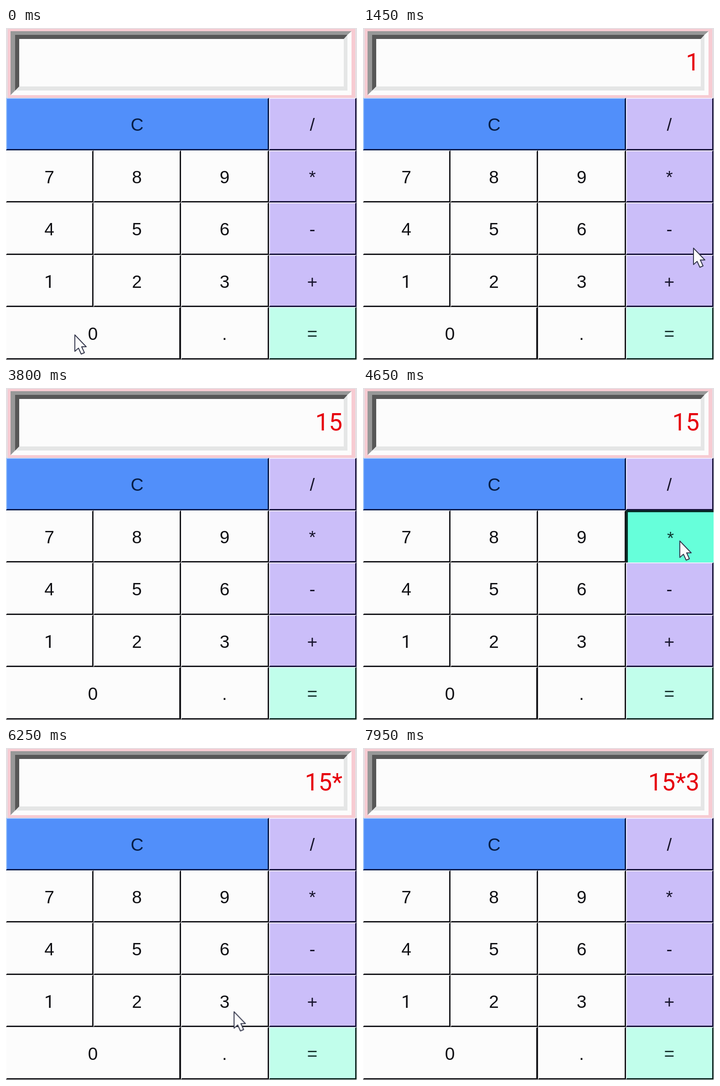
An HTML page for the animation above (8 s loop, 770 by 727 pixels).

```html
<!DOCTYPE html>
<html lang="en">
<head>
<meta charset="utf-8">
<title>Calculator</title>
<style>
  html, body { margin: 0; width: 100%; height: 100%; overflow: hidden; background: #fcfcfc; }
  #stage {
    position: relative; width: 770px; height: 727px; overflow: hidden;
    font-family: "Liberation Sans", Arial, sans-serif;
  }
  #stage div { position: absolute; box-sizing: border-box; }

  .panel {
    left: 0; top: 0; width: 770px; height: 153px; background: #f7cbd2;
    border: solid #e5dfe3; border-width: 2px 4px 0 4px;
  }
  .bevel {
    left: 10px; top: 7px; width: 748px; height: 140px; border: solid;
    border-width: 8px 9px 10px 10px; border-color: #989898 #fcfcfc #fcfcfc #989898;
  }
  .screen {
    left: 20px; top: 15px; width: 729px; height: 122px; background: #fcfcfc; border: solid;
    border-width: 9px 8px 9px 9px; border-color: #575757 #e5e6e6 #e5e6e6 #575757;
  }
  .screen::after {
    content: ""; position: absolute; right: 3px; top: 21px;
    font: 53px/60px Roboto, sans-serif; color: #e6000c;
    animation: typing 8s step-end infinite;
  }
  @keyframes typing {
    0% { content: ""; }
    11.25% { content: "1"; }
    38.75% { content: "15"; }
    58.75% { content: "15*"; }
    88.75%, 100% { content: "15*3"; }
  }

  .key {
    --face: #fcfcfc; --ink: #101014; --light: #fdfdfd; --dark: #17171b;
    background: var(--face); color: var(--ink);
    border: solid; border-width: 2px 3px 3px 2px;
    border-color: var(--light) var(--dark) var(--dark) var(--light);
    padding-right: 1px; text-align: center; font-size: 39px; line-height: 114px;
  }
  .op { --face: #cbbef9; --ink: #17142c; --light: #f1ecff; --dark: #17123a; }
  .clear { --face: #518ffa; --ink: #071c44; --light: #a9cdfa; --dark: #071a4a; }
  .equals { --face: #c1feeb; --ink: #14302a; --light: #e4fff7; --dark: #0d2620; }
  .zero { border-right-width: 4px; }
  .one { font-family: Roboto, sans-serif; }

  .typed { animation: press 8s step-end infinite; }
  @keyframes press {
    0% {
      background: #66ffda; color: #0c3a30; border-width: 4px 0 0 4px;
      border-color: #062e26 #66ffda #66ffda #062e26;
    }
    3.75%, 100% {
      background: var(--face); color: var(--ink); border-width: 2px 3px 3px 2px;
      border-color: var(--light) var(--dark) var(--dark) var(--light);
    }
  }

  #pointer {
    position: absolute; left: 0; top: 0; overflow: visible;
    animation: wander 8s ease-in-out infinite;
  }
  /* Visits each pressed key, then moves aside. */
  @keyframes wander {
    0% { transform: translate(151px, 672px); }
    7.5%, 11.25% { transform: translate(115px, 565px); }
    18.125%, 20% { transform: translate(725px, 482px); }
    30% { transform: translate(392px, 535px); }
    35%, 38.75% { transform: translate(305px, 450px); }
    46%, 49% { transform: translate(790px, 470px); }
    55%, 58.75% { transform: translate(695px, 335px); }
    67%, 70% { transform: translate(504px, 677px); }
    80%, 85.5% { transform: translate(500px, 570px); }
    87.5% { transform: translate(550px, 677px); }
    92%, 100% { transform: translate(600px, 745px); }
  }
</style>
</head>
<body>
<div id="stage">
  <div class="panel"></div>
  <div class="bevel"></div>
  <div class="screen"></div>
  <svg id="pointer" width="30" height="46">
    <path d="M0 0V36L8 29L14 42L21 39L15 26H25Z" fill="#fcfcfc" stroke="#34374c" stroke-width="2" stroke-linejoin="round"/>
  </svg>
</div>
<script>
  const columns = [0, 192, 384, 577, 769];
  const rows = [153, 268, 382, 497, 611, 726];
  // Each row lists [label, columns spanned].
  const layout = [
    [["C", 3], ["/", 1]],
    [["7", 1], ["8", 1], ["9", 1], ["*", 1]],
    [["4", 1], ["5", 1], ["6", 1], ["-", 1]],
    [["1", 1], ["2", 1], ["3", 1], ["+", 1]],
    [["0", 2], [".", 1], ["=", 1]]
  ];
  const kinds = {
    "C": "clear", "=": "equals", "/": "op", "*": "op", "-": "op", "+": "op",
    "0": "zero", "1": "one"
  };
  const pressTimes = { "1": 600, "5": 2800, "*": 4400, "3": 6800 };

  const stage = document.getElementById("stage");
  const pointer = document.getElementById("pointer");

  layout.forEach((keys, row) => {
    let column = 0;
    for (const [label, span] of keys) {
      const key = document.createElement("div");
      const left = columns[column];
      column += span;
      key.className = `key ${kinds[label] || ""}`;
      key.textContent = label;
      key.style.left = `${left}px`;
      key.style.top = `${rows[row]}px`;
      key.style.width = `${columns[column] - left}px`;
      key.style.height = `${rows[row + 1] - rows[row]}px`;
      if (label in pressTimes) {
        key.classList.add("typed");
        key.style.animationDelay = `${pressTimes[label] - 8000}ms`;
      }
      stage.insertBefore(key, pointer);
    }
  });
</script>
</body>
</html>
```
